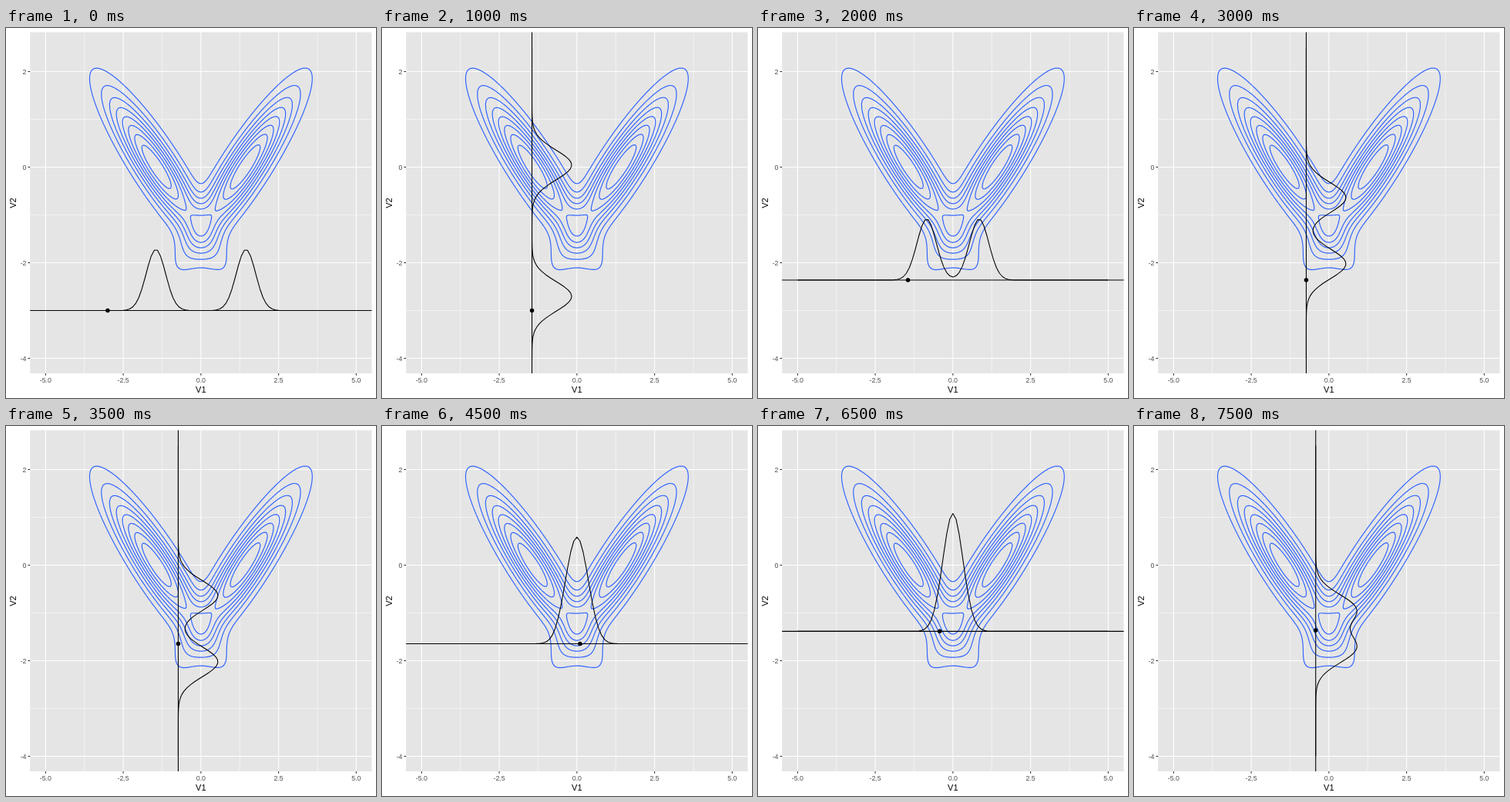
These frames come from a looping animation (480 px wide and 480 px high, 8 s). An HTML page with a canvas:

```html
<!DOCTYPE html>
<html lang="en">
<head>
<meta charset="utf-8">
<title>Gibbs sampling</title>
<style>
  html, body { margin: 0; width: 100%; height: 100%; overflow: hidden; background: #fff; }
  canvas { display: block; width: 480px; height: 480px; }
</style>
</head>
<body>
<canvas id="stage" width="480" height="480"></canvas>
<script>
const ctx = document.getElementById('stage').getContext('2d');
const PANEL = { left: 31.2, top: 5.5, right: 474.5, bottom: 448 };
const STEP = 500;
const FONT = '"Liberation Sans", Arial, sans-serif';

const px = x => 252.85 + 40.3 * x;
const py = y => 180.5 - 62 * y;

// Two correlated normals centred at (-MU, 0) and (MU, 0)
const MU = 1.4, RHO = 0.95, SD = Math.sqrt(1 - RHO * RHO);

// Successive states of the sampler
const xs = [-3, -1.447, -0.73, 0.1, -0.425];
const ys = [-3, -2.363, -1.645, -1.385, -1.363];

const normal = (v, m) => Math.exp(-0.5 * ((v - m) / SD) ** 2) / (SD * Math.sqrt(2 * Math.PI));
const pair = (v, a, b) => normal(v, a) + normal(v, b);
const xGivenY = (x, y) => pair(x, MU + RHO * y, -MU - RHO * y);
const yGivenX = (y, x) => pair(y, RHO * (x - MU), -RHO * (x + MU));

// Smoothed joint density, slightly flattened where the limbs cross
const VX = 1.1, VY = 1.01, COV = 0.945, DET = VX * VY - COV * COV;
function limb(dx, dy, peak) {
  const q = (VY * dx * dx - 2 * COV * dx * dy + VX * dy * dy) / DET;
  return peak * Math.exp(-q / 2);
}
function density(x, y) {
  const sum = limb(x - 1.38, y + 0.04, 0.1822) + limb(-x - 1.38, y + 0.04, 0.1812);
  return sum * (1 - 0.12 * Math.exp(-x * x / 1.5 - (y + 1.22) ** 2 / 1.5));
}

function buildContours() {
  const n = 240, path = new Path2D(), grid = [];
  for (let j = 0; j <= n; j++) {
    for (let i = 0; i <= n; i++) {
      const x = -4.5 + 9 * i / n, y = -3.2 + 6.2 * j / n;
      grid.push([px(x), py(y), density(x, y)]);
    }
  }
  function cut(tri, level) {
    const ends = [];
    for (let k = 0; k < 3; k++) {
      const a = tri[k], b = tri[(k + 1) % 3];
      if ((a[2] < level) !== (b[2] < level)) {
        const f = (level - a[2]) / (b[2] - a[2]);
        ends.push([a[0] + f * (b[0] - a[0]), a[1] + f * (b[1] - a[1])]);
      }
    }
    if (ends.length === 2) {
      path.moveTo(...ends[0]);
      path.lineTo(...ends[1]);
    }
  }
  for (let j = 0; j < n; j++) {
    for (let i = 0; i < n; i++) {
      const o = j * (n + 1) + i;
      const a = grid[o], b = grid[o + 1], c = grid[o + n + 1], d = grid[o + n + 2];
      for (let k = 1; k <= 9; k++) {
        cut([a, b, c], k * 0.02);
        cut([b, d, c], k * 0.02);
      }
    }
  }
  return path;
}
const contours = buildContours();

function line(x1, y1, x2, y2, color, width) {
  ctx.strokeStyle = color;
  ctx.lineWidth = width;
  ctx.beginPath();
  ctx.moveTo(x1, y1);
  ctx.lineTo(x2, y2);
  ctx.stroke();
}
const hline = (y, color, width) => line(PANEL.left, py(y), PANEL.right, py(y), color, width);
const vline = (x, color, width) => line(px(x), PANEL.top, px(x), PANEL.bottom, color, width);

function text(str, x, y, size, color, align) {
  ctx.font = size + 'px ' + FONT;
  ctx.fillStyle = color;
  ctx.textAlign = align;
  ctx.fillText(str, x, y);
}

function drawPlot() {
  const { left, top, right, bottom } = PANEL;
  ctx.lineCap = 'butt';
  ctx.fillStyle = '#fff';
  ctx.fillRect(0, 0, 480, 480);
  ctx.fillStyle = '#e5e5e5';
  ctx.fillRect(left, top, right - left, bottom - top);

  for (const x of [-3.75, -1.25, 1.25, 3.75]) vline(x, '#fff', 0.53);
  for (const y of [1, -1, -3]) hline(y, '#fff', 0.53);
  for (const x of [-5, -2.5, 0, 2.5, 5]) {
    vline(x, '#fff', 1.07);
    line(px(x), bottom, px(x), bottom + 2.75, '#333', 1.07);
    text(x.toFixed(1), px(x), 460, 8.8, '#4d4d4d', 'center');
  }
  for (const y of [2, 0, -2, -4]) {
    hline(y, '#fff', 1.07);
    line(left - 2.75, py(y), left, py(y), '#333', 1.07);
    text(String(y), 26.5, py(y) + 3.2, 8.8, '#4d4d4d', 'right');
  }
  text('V1', 252.85, 473, 11, '#000', 'center');
  ctx.save();
  ctx.translate(12.7, 227);
  ctx.rotate(-Math.PI / 2);
  text('V2', 0, 0, 11, '#000', 'center');
  ctx.restore();

  ctx.lineCap = 'round';
  ctx.strokeStyle = '#3366ff';
  ctx.lineWidth = 1.2;
  ctx.stroke(contours);
  ctx.lineCap = 'butt';
}

function curve(from, to, step, point) {
  ctx.strokeStyle = '#000';
  ctx.lineWidth = 1.07;
  ctx.beginPath();
  const n = Math.round((to - from) / step);
  for (let i = 0; i <= n; i++) ctx.lineTo(...point(from + i * step));
  ctx.stroke();
}

function drawState(k) {
  const i = k >> 2, phase = k & 3;
  const x = xs[phase === 0 ? i : i + 1];
  const y = ys[phase === 3 ? i + 1 : i];
  if (phase < 2) {
    hline(y, '#000', 1.07);
    curve(-5, 5, 0.1, v => [px(v), py(y + xGivenY(v, y))]);
  } else {
    vline(x, '#000', 1.07);
    curve(-4, 2.5, 0.065, v => [px(x + yGivenX(v, x)), py(v)]);
  }
  ctx.fillStyle = '#000';
  ctx.beginPath();
  ctx.arc(px(x), py(y), 2.75, 0, 2 * Math.PI);
  ctx.fill();
}

ctx.lineJoin = 'round';
const start = performance.now();
function render(now) {
  const t = Math.max(0, now - start);
  drawPlot();
  drawState(Math.floor(t / STEP) % 16);
  requestAnimationFrame(render);
}
render(start);
</script>
</body>
</html>
```
